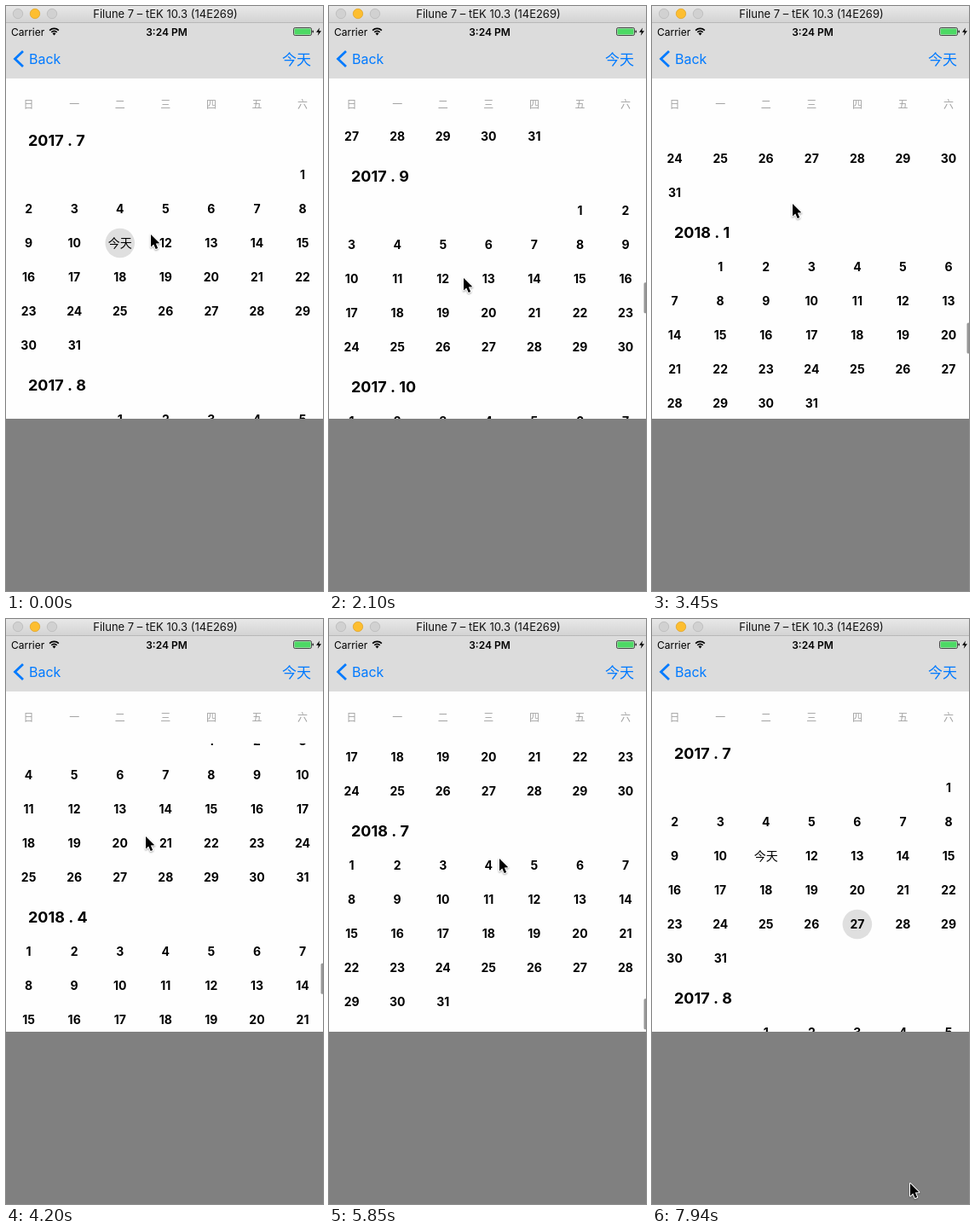
An HTML page with a canvas for the animation above (8 s loop, 372 by 686 pixels).

```html
<!DOCTYPE html>
<html lang="en">
<head>
<meta charset="utf-8">
<title>Calendar</title>
<style>
html, body { margin: 0; width: 100%; height: 100%; overflow: hidden; background: #808080; }
canvas { display: block; }
</style>
</head>
<body>
<canvas id="stage" width="372" height="686"></canvas>
<script>
const ctx = document.getElementById('stage').getContext('2d');
const LOOP = 8000, STEP = 150, LAST = 7940;
const LATIN = 'Inter, "Noto Sans CJK SC", sans-serif';
const CJK = '"Noto Sans CJK SC", "Noto Sans CJK JP", "Noto Sans CJK", sans-serif';
const BLUE = '#007aff';
const MAX_SCROLL = 2953, TODAY = '今天';
const LIST_TOP = 146, LIST_BOTTOM = 484;

const scrollKeys = [
  [1400, 0], [1600, 150], [1800, 370], [2100, 492], [2250, 496], [2500, 496],
  [2750, 760], [3000, 990], [3200, 1080], [3450, 1454], [3750, 1780], [3950, 1880],
  [4200, 2111], [4450, 2400], [4700, 2560], [4950, 2860], [5100, 2975],
  [5250, 2955], [5700, MAX_SCROLL]
];
const pointerKeys = [
  [0, 170, 268], [600, 238, 352], [850, 238, 352], [1050, 232, 320], [1200, 215, 305],
  [1350, 215, 305], [1650, 165, 345], [1800, 157, 275], [2100, 158, 319], [2250, 160, 325],
  [2500, 160, 325], [2700, 165, 250], [2900, 165, 240], [3150, 163, 325], [3450, 165, 232],
  [3600, 164, 240], [3850, 163, 320], [4200, 164, 255], [4350, 165, 235], [4700, 165, 320],
  [4900, 167, 235], [5250, 168, 317], [5650, 172, 315], [6450, 339, 73], [6600, 340, 60],
  [6800, 339, 56], [7350, 214, 516], [7500, 214, 516], [LAST, 303, 662]
];

// Monotone cubic through keyed values: no overshoot, flat at turning points.
function track(keys, t, col) {
  const end = keys.length - 1;
  if (t <= keys[0][0]) return keys[0][col];
  if (t >= keys[end][0]) return keys[end][col];
  const i = keys.findIndex(k => k[0] > t) - 1;
  const rate = j => (keys[j + 1][col] - keys[j][col]) / (keys[j + 1][0] - keys[j][0]);
  const slope = j => {
    if (j === 0 || j === end) return 0;
    const a = rate(j - 1), b = rate(j);
    return a * b <= 0 ? 0 : 2 * a * b / (a + b);
  };
  const span = keys[i + 1][0] - keys[i][0], u = (t - keys[i][0]) / span;
  const v = 1 - u;
  return keys[i][col] * (1 + 2 * u) * v * v + keys[i + 1][col] * u * u * (3 - 2 * u)
    + span * (slope(i) * u * v * v - slope(i + 1) * u * u * v);
}

function scrollAt(t) {
  if (t < 6660) return Math.round(track(scrollKeys, t, 1));
  const u = Math.min(1, (t - 6660) / 340);
  return Math.round(MAX_SCROLL * (1 - u * u * (3 - 2 * u)));
}

function text(str, x, y, font, color = '#000', align = 'center') {
  ctx.font = font;
  ctx.fillStyle = color;
  ctx.textAlign = align;
  ctx.fillText(str, x, y);
}

function disc(x, y, r, color, edge) {
  ctx.beginPath();
  ctx.arc(x, y, r, 0, Math.PI * 2);
  ctx.fillStyle = color;
  ctx.fill();
  if (edge) {
    ctx.strokeStyle = edge;
    ctx.lineWidth = 0.8;
    ctx.stroke();
  }
}

function poly(points, color) {
  ctx.beginPath();
  points.forEach(([x, y]) => ctx.lineTo(x, y));
  ctx.closePath();
  ctx.fillStyle = color;
  ctx.fill();
}

function pill(x, y, w, h, r, color) {
  ctx.beginPath();
  ctx.roundRect(x, y, w, h, r);
  ctx.fillStyle = color;
  ctx.fill();
}

const columnX = i => 26.6 + 53.57 * i;

const months = [];
for (let m = 6, top = 157; m <= 18; m++) {
  const lead = new Date(2017, m, 1).getDay();
  const days = new Date(2017, m + 1, 0).getDate();
  months.push({ top, lead, days, title: `${2017 + Math.floor(m / 12)} . ${m % 12 + 1}` });
  top += 47 + 40 * Math.ceil((lead + days) / 7);
}

function drawWindowBar() {
  const shade = ctx.createLinearGradient(0, 0, 0, 20);
  shade.addColorStop(0, '#e8e8e8');
  shade.addColorStop(1, '#d2d2d2');
  ctx.fillStyle = shade;
  ctx.fillRect(0, 0, 372, 20);
  ctx.fillStyle = '#b8b8b8';
  ctx.fillRect(0, 19, 372, 1);
  disc(14, 9, 5.7, '#d1d1d1', '#bababa');
  disc(34, 9, 5.7, '#fdbe30', '#e0a52b');
  disc(54, 9, 5.7, '#d1d1d1', '#bababa');
  text('Filune 7 – tEK 10.3 (14E269)', 187, 14, `13px ${LATIN}`, '#111');
}

function drawWifi() {
  ctx.strokeStyle = '#000';
  ctx.lineWidth = 1.6;
  for (const r of [4.6, 7.6]) {
    ctx.beginPath();
    ctx.arc(56.5, 34, r, -Math.PI * 0.75, -Math.PI * 0.25);
    ctx.stroke();
  }
  poly([[56.5, 34.5], [54.4, 32], [56.5, 31.2], [58.6, 32]], '#000');
}

function drawBattery() {
  ctx.beginPath();
  ctx.roundRect(337.5, 25.5, 21, 9, 1.8);
  ctx.strokeStyle = '#222';
  ctx.lineWidth = 0.8;
  ctx.stroke();
  pill(338.5, 26.5, 19, 7, 0.8, '#4cd964');
  pill(359.5, 28.5, 1.4, 3, 0.7, '#222');
  poly([[368, 25.5], [364, 30.8], [366.8, 30.8], [365.8, 34.8], [370, 29.2], [367.2, 29.2]], '#000');
}

function drawNavigation() {
  ctx.fillStyle = '#dcdcdc';
  ctx.fillRect(0, 20, 372, 65);
  text('Carrier', 6, 34.5, `12px ${LATIN}`, '#000', 'left');
  drawWifi();
  text('3:24 PM', 188.5, 34.5, `600 12px ${LATIN}`);
  drawBattery();
  ctx.beginPath();
  ctx.moveTo(20, 53);
  ctx.lineTo(10.5, 62);
  ctx.lineTo(20, 71);
  ctx.strokeStyle = BLUE;
  ctx.lineWidth = 2.8;
  ctx.stroke();
  text('Back', 27, 68, `16px ${LATIN}`, BLUE, 'left');
  text(TODAY, 341, 68.5, `17px ${CJK}`, BLUE);
}

function drawMonths(scroll, selected) {
  ctx.save();
  ctx.beginPath();
  ctx.rect(0, LIST_TOP, 372, LIST_BOTTOM - LIST_TOP);
  ctx.clip();
  months.forEach(({ top, lead, days, title }, index) => {
    const y = top - scroll;
    if (y > 510 || y < -200) return;
    text(title, 26, y + 6.5, `700 18px ${LATIN}`, '#000', 'left');
    for (let day = 1; day <= days; day++) {
      const cell = lead + day - 1;
      const x = columnX(cell % 7), cy = y + 41 + 40 * Math.floor(cell / 7);
      if (index === 0 && day === selected) disc(x, cy, 17.3, '#dfdfdf');
      if (index === 0 && day === 11) text(TODAY, x, cy + 5.3, `500 14px ${CJK}`);
      else text(day, x, cy + 5, `700 14px ${LATIN}`);
    }
  });
  ctx.restore();
}

function drawScrollbar(scroll) {
  const over = Math.max(0, scroll - MAX_SCROLL);
  const top = 300 + 0.0492 * Math.min(scroll, MAX_SCROLL) + over;
  pill(369.5, top, 4, Math.max(8, 36 - over), 1.5, '#989898');
}

function drawPointer(x, y) {
  ctx.save();
  ctx.translate(x, y);
  ctx.beginPath();
  [[0, 0], [0, 14.5], [3.3, 11.5], [5.7, 17], [8.2, 16], [5.8, 10.6], [10.3, 10.3]]
    .forEach(([px, py]) => ctx.lineTo(px, py));
  ctx.closePath();
  ctx.shadowColor = 'rgba(0,0,0,.35)';
  ctx.shadowBlur = 2;
  ctx.shadowOffsetY = 1;
  ctx.strokeStyle = '#fff';
  ctx.lineWidth = 2;
  ctx.lineJoin = 'round';
  ctx.stroke();
  ctx.shadowColor = 'transparent';
  ctx.fillStyle = '#000';
  ctx.fill();
  ctx.restore();
}

function draw(t) {
  const scroll = scrollAt(t);
  ctx.fillStyle = '#808080';
  ctx.fillRect(0, 0, 372, 686);
  ctx.fillStyle = '#fefefe';
  ctx.fillRect(0, 85, 372, LIST_BOTTOM - 85);
  drawWindowBar();
  drawNavigation();
  [...'日一二三四五六'].forEach((name, i) => text(name, columnX(i), 119.5, `12px ${CJK}`, '#a2a2a2'));
  drawMonths(scroll, t < 750 ? 11 : 27);
  if (t >= 1500 && t < 7300) drawScrollbar(scroll);
  drawPointer(Math.round(track(pointerKeys, t, 1)), Math.round(track(pointerKeys, t, 2)));
}

const start = performance.now();
function tick() {
  const t = (performance.now() - start + 8) % LOOP;
  draw(t >= LAST ? LAST : Math.floor(t / STEP) * STEP);
  requestAnimationFrame(tick);
}
tick();
</script>
</body>
</html>
```
